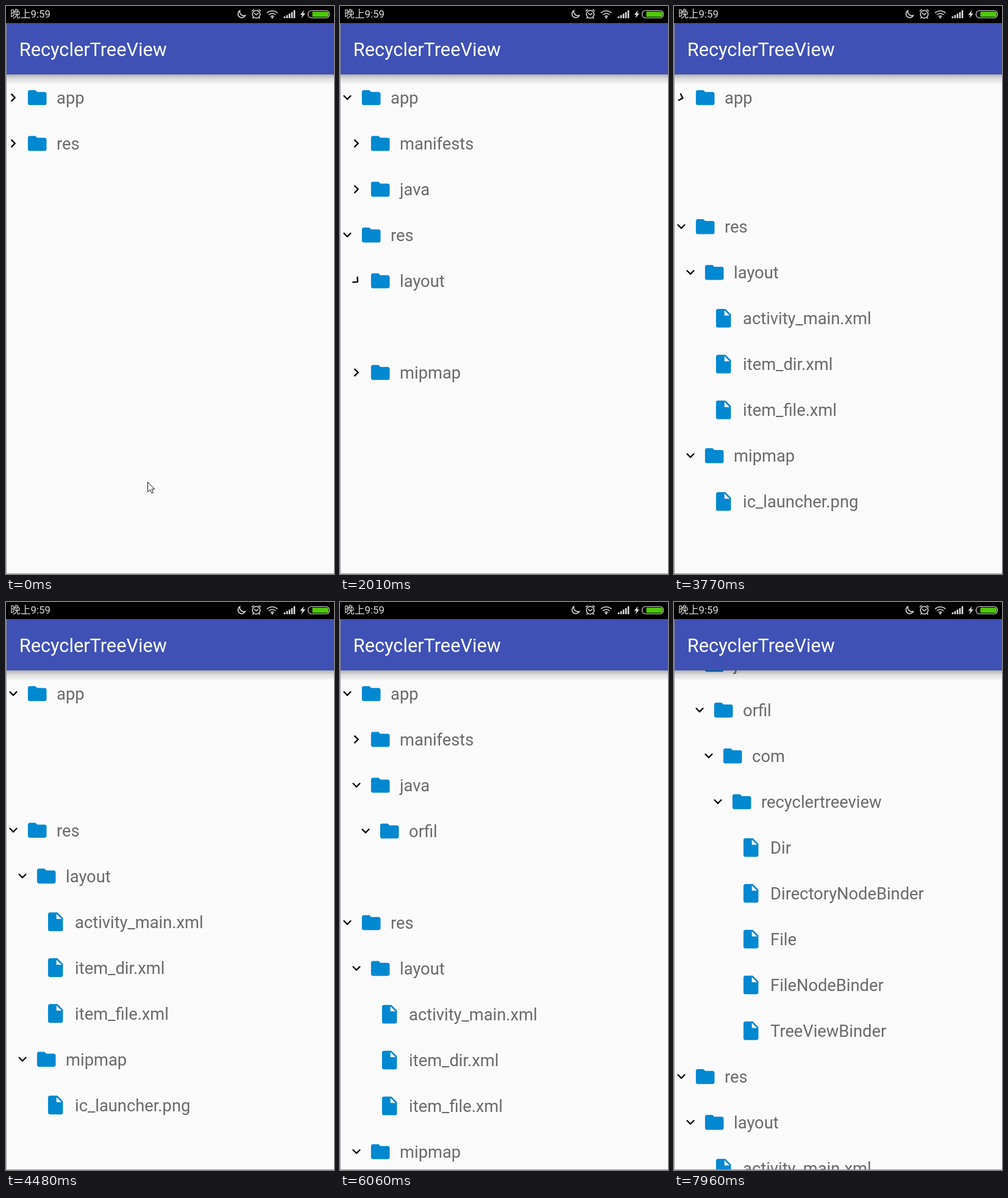
Animation of 538x930 px, one loop 8000 ms. Source, as an HTML page:

```html
<!DOCTYPE html>
<html lang="en">
<head>
<meta charset="utf-8">
<title>RecyclerTreeView</title>
<style>
  html, body { margin: 0; width: 100%; height: 100%; overflow: hidden; background: #fafafa; }
  svg { display: block; }
  text { font-family: Roboto, "Noto Sans CJK SC", "Noto Sans CJK", sans-serif; }
  #rows text { font-size: 27.3px; fill: #6a6a6a; }
  .icon { fill: #0288d1; }
  .line { fill: none; stroke: #ddd; stroke-width: 1.6; }
</style>
</head>
<body>
<svg width="538" height="930" viewBox="0 0 538 930">
  <defs>
    <linearGradient id="shade" x2="0" y2="1">
      <stop offset="0" stop-opacity=".3"/>
      <stop offset=".4" stop-opacity=".12"/>
      <stop offset="1" stop-opacity="0"/>
    </linearGradient>
  </defs>
  <g id="rows"></g>
  <rect y="112" width="538" height="17" fill="url(#shade)"/>
  <rect y="28" width="538" height="84" fill="#3f51b5"/>
  <path d="M.5 28V929.5H538" fill="none" stroke="#999"/>
  <text x="21.8" y="82" font-size="30.7" fill="#fff">RecyclerTreeView</text>

  <rect width="538" height="28"/>
  <text x="7" y="19.3" font-size="16.8" fill="#ddd">晚上9:59</text>
  <path class="line" d="M383.5 7.5A6.3 6.3 0 1 0 392.5 15.5A7 7 0 0 1 383.5 7.5Z"/>
  <g class="line">
    <circle cx="410.5" cy="13.5" r="6.3"/>
    <path d="M407 11.5L410.5 14.5L414 11.5M403 8.5L406.5 5.5M418 8.5L414.5 5.5M406 18.5L404.5 20.5M415 18.5L416.5 20.5"/>
  </g>
  <g class="line">
    <path d="M428 11.5A12.5 12.5 0 0 1 445.5 11.5M431 14.5A8.3 8.3 0 0 1 442.5 14.5M434 17.3A4 4 0 0 1 439.5 17.3"/>
    <circle cx="436.8" cy="18.8" r=".8"/>
  </g>
  <path d="M457 20v-3M461 20v-5M465 20v-7.5M469 20v-10M473 20v-13" stroke="#ddd" stroke-width="2.6"/>
  <path d="M488.5 7L482.5 14.5H486L484.5 20L491 12.3H487.5Z" fill="#ddd"/>
  <rect class="line" x="495.5" y="7.5" width="35" height="12" rx="5.5" style="stroke-width:1.2"/>
  <path d="M502.5 9.3H526A3 3 0 0 1 529 12.3V14.7A3 3 0 0 1 526 17.7H502.5Z" fill="#4fc80a"/>
  <path id="cursor" d="M232.5 779.5V795.5L236.3 792L239 797.8L241.5 796.8L239 791H243.8Z" fill="#fff" stroke="#111"/>
</svg>
<script>
const CHEVRON = 'M8.3 16.34l4.58-4.59-4.58-4.59L9.71 5.75l6 6-6 6z';
const FOLDER = 'M10 4H4c-1.1 0-2 .9-2 2v12c0 1.1.9 2 2 2h16c1.1 0 2-.9 2-2V8c0-1.1-.9-2-2-2h-8l-2-2z';
const FILE = 'M6 2c-1.1 0-2 .9-2 2v16c0 1.1.9 2 2 2h12c1.1 0 2-.9 2-2V8l-6-6H6zm7 7V3.5L18.5 9H13z';
const LOOP = 8000, SCROLL_AT = 7960, SCROLL = 198;

// depth, label, times of alternating open and close taps (none for files)
const nodes = [
  [0, 'app', [290, 3556, 4200]],
  [1, 'manifests', []],
  [1, 'java', [4920]],
  [2, 'orfil', [5770]],
  [3, 'com', [6350]],
  [4, 'recyclertreeview', [7100]],
  [5, 'Dir'],
  [5, 'DirectoryNodeBinder'],
  [5, 'File'],
  [5, 'FileNodeBinder'],
  [5, 'TreeViewBinder'],
  [0, 'res', [980]],
  [1, 'layout', [1867]],
  [2, 'activity_main.xml'],
  [2, 'item_dir.xml'],
  [2, 'item_file.xml'],
  [1, 'mipmap', [2740]],
  [2, 'ic_launcher.png']
].map(([depth, label, taps]) => ({ depth, label, taps }));

// The screen refreshes only at these moments
const ticks = [0, 120, 410, 560, 700, 850, 1120, 1255, 1390, 2010, 2130, 2280, 2430,
  2860, 2990, 3120, 3250, 3650, 3770, 3920, 4010, 4320, 4480, 4630,
  5030, 5175, 5320, 5465, 5610, 5910, 6060, 6180, 6330, 6450, 6590, 6730, 6870,
  7150, 7280, 7410, 7550, 7680, SCROLL_AT];

const list = document.getElementById('rows');
const cursor = document.getElementById('cursor');

function add(parent, tag, attrs) {
  const el = document.createElementNS('http://www.w3.org/2000/svg', tag);
  for (const key in attrs) el.setAttribute(key, attrs[key]);
  return parent.appendChild(el);
}

for (const n of nodes) {
  const x = 15 * n.depth;
  n.el = add(list, 'g', {});
  if (n.taps) n.arrow = add(n.el, 'path', { d: CHEVRON });
  add(n.el, 'path', {
    class: 'icon', d: n.taps ? FOLDER : FILE,
    transform: `translate(${51.2 + x} 0) scale(1.53) translate(-12 -12)`
  });
  add(n.el, 'text', { x: 83.1 + x, y: 10 }).textContent = n.label;
}

function ease(time, duration) {
  const p = Math.min(1, Math.max(0, time / duration));
  return (1 - Math.cos(p * Math.PI)) / 2;
}

// Opening makes room, then fades the children in; closing does the reverse
function folderState(taps, t) {
  const past = taps.filter(tap => tap <= t);
  if (!past.length) return { turn: 0, room: 0, alpha: 0 };
  const age = t - past[past.length - 1];
  const turn = ease(age, 300);
  if (past.length % 2) return { turn, room: ease(age - 45, 250), alpha: ease(age - 295, 120) };
  return { turn: 1 - turn, room: 1 - ease(age - 165, 250), alpha: 1 - ease(age - 45, 120) };
}

function draw(t) {
  const room = [1], alpha = [1];
  let y = 150 - (t >= SCROLL_AT ? SCROLL : 0);
  for (const n of nodes) {
    const d = n.depth;
    n.el.setAttribute('transform', `translate(0 ${y})`);
    n.el.setAttribute('opacity', alpha[d]);
    y += 75 * room[d];
    if (!n.taps) continue;
    const s = folderState(n.taps, t);
    n.arrow.setAttribute('transform',
      `translate(${12 + 15 * d} 0) rotate(${90 * s.turn}) scale(1.15) translate(-12 -11.75)`);
    room[d + 1] = room[d] * s.room;
    alpha[d + 1] = alpha[d] * s.alpha;
  }
  cursor.setAttribute('visibility', t < 120 ? 'visible' : 'hidden');
}

const start = performance.now();
function frame() {
  const now = (performance.now() - start) % LOOP;
  draw(ticks.filter(tick => tick <= now).pop());
  requestAnimationFrame(frame);
}
frame();
</script>
</body>
</html>
```
